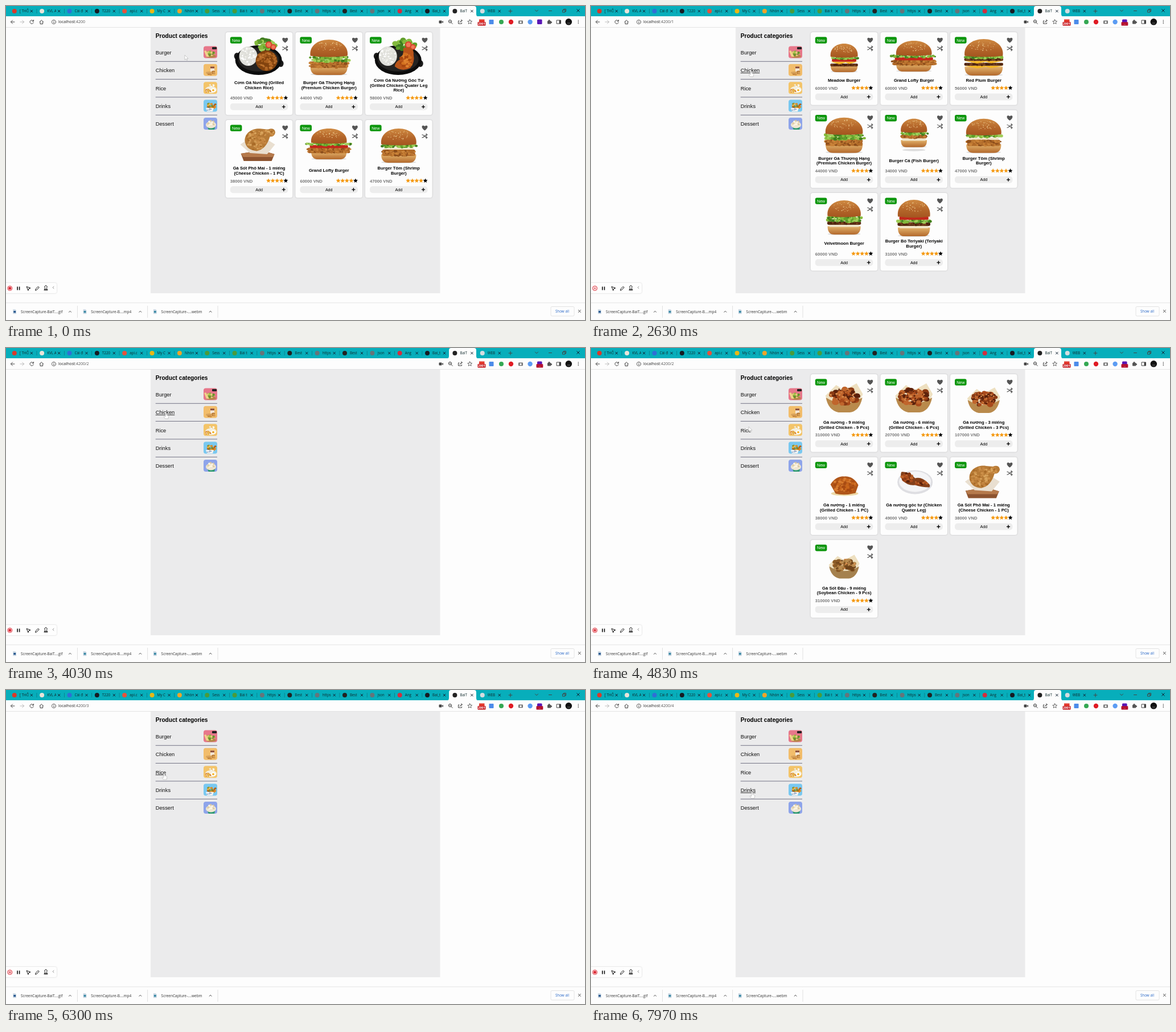
Recreate the animation shown at these times as an HTML page. Size 1017 by 551 pixels, loop 8 s.

```html
<!DOCTYPE html>
<html lang="en">
<head>
<meta charset="utf-8">
<title>Food shop</title>
<style>
html, body { margin: 0; width: 100%; height: 100%; overflow: hidden; background: #fdfdfd; }
svg { display: block; width: 1017px; height: 551px; font-family: "Liberation Sans", Arial, sans-serif; }
.ui { font-family: "Open Sans", "Noto Sans", sans-serif; }
.bold { font-weight: 700; }
.mid { text-anchor: middle; }
.line { fill: none; stroke: #444; stroke-width: 1; stroke-linecap: round; stroke-linejoin: round; }
.card { filter: drop-shadow(0 .8px .8px #0003); }
.step { visibility: hidden; animation: 8s step-end infinite; }
#home { animation-name: home; }
#burgers { animation-name: burgers; }
#chicken { animation-name: chicken; }
#rice { animation-name: rice; }
#badge { animation-name: badge; }
#path1 { animation-name: path1; }
#path2 { animation-name: path2; }
#path3 { animation-name: path3; }
#path4 { animation-name: path4; }
#over0 { animation-name: over0; }
#over1 { animation-name: over1; }
#over2 { animation-name: over2; }
#over3 { animation-name: over3; }
#arrow { animation-name: arrow; }
#hand { animation-name: hand; }
#cursor { animation: move 8s linear infinite; }
#dot { animation: pulse 1s ease-in-out infinite; }
@keyframes home { 0% { visibility: visible } 15.5%, 100% { visibility: hidden } }
@keyframes burgers { 27% { visibility: visible } 46.5%, 100% { visibility: hidden } }
@keyframes chicken { 56% { visibility: visible } 74.5%, 100% { visibility: hidden } }
@keyframes rice { 81% { visibility: visible } 93.5%, 100% { visibility: hidden } }
@keyframes badge { 15.5%, 100% { visibility: visible } }
@keyframes path1 { 15.5% { visibility: visible } 46.5%, 100% { visibility: hidden } }
@keyframes path2 { 46.5% { visibility: visible } 74.5%, 100% { visibility: hidden } }
@keyframes path3 { 74.5% { visibility: visible } 93.5%, 100% { visibility: hidden } }
@keyframes path4 { 93.5%, 100% { visibility: visible } }
@keyframes over0 { 10% { visibility: visible } 17.5%, 100% { visibility: hidden } }
@keyframes over1 { 23.75% { visibility: visible } 57.5%, 100% { visibility: hidden } }
@keyframes over2 { 62% { visibility: visible } 79.5%, 100% { visibility: hidden } }
@keyframes over3 { 83%, 100% { visibility: visible } }
@keyframes arrow {
  0%, 17.5%, 57.5%, 79.5% { visibility: visible }
  10%, 23.75%, 62%, 83%, 100% { visibility: hidden }
}
@keyframes hand {
  0%, 17.5%, 57.5%, 79.5% { visibility: hidden }
  10%, 23.75%, 62%, 83%, 100% { visibility: visible }
}
@keyframes move {
  0%, 2.5% { transform: translate(314px, 86px) }
  11.25%, 16.5% { transform: translate(284px, 82px) }
  20.375% { transform: translate(282px, 98px) }
  25%, 56.25% { transform: translate(281px, 114px) }
  60.375% { transform: translate(277px, 138px) }
  63.75%, 78.75% { transform: translate(278px, 147px) }
  83.75%, 86.625% { transform: translate(282px, 177px) }
  100% { transform: translate(283px, 180px) }
}
@keyframes pulse { 0%, 100% { opacity: 1 } 50% { opacity: .15 } }
</style>
</head>
<body>
<svg id="stage" viewBox="0 0 1017 551"></svg>
<script>
let seed = 7;
const rnd = () => (seed = seed * 16807 % 2147483647) / 2147483647;

const ell = (x, y, rx, ry, fill) => `<ellipse cx="${x}" cy="${y}" rx="${rx}" ry="${ry}" fill="${fill}"/>`;
const dot = (x, y, r, fill) => ell(x, y, r, r, fill);
const box = (x, y, w, h, fill, r = 0) => `<rect x="${x}" y="${y}" width="${w}" height="${h}" rx="${r}" fill="${fill}"/>`;
const shape = (d, fill) => `<path d="${d}" fill="${fill}"/>`;
const line = (d, extra = '') => `<path class="line" d="${d}" ${extra}/>`;
const text = (x, y, size, str, fill = '#111', cls = '') =>
  `<text x="${x}" y="${y + size * .36}" font-size="${size}" fill="${fill}" class="${cls}">${str}</text>`;
const at = (x, y, inner, scale = 1) => `<g transform="translate(${x} ${y}) scale(${scale})">${inner}</g>`;
const cross = (x, y, r, color) => line(`M${x - r} ${y - r}l${2 * r} ${2 * r}m0 ${-2 * r}l${-2 * r} ${2 * r}`, `style="stroke:${color}"`);
const chevron = (x, y, r) => line(`M${x - r} ${y + r / 2}l${r} ${-r}l${r} ${r}`);

// Random spots inside an ellipse
function spots(n, x, y, rx, ry, r, colors) {
  let out = '';
  for (let i = 0; i < n; i++) {
    const a = rnd() * 6.283, d = Math.sqrt(rnd()), k = r * (.7 + rnd() * .6);
    out += ell((x + rx * d * Math.cos(a)).toFixed(1), (y + ry * d * Math.sin(a)).toFixed(1),
      k.toFixed(1), (k * .8).toFixed(1), colors[i % colors.length]);
  }
  return out;
}

const GREEN = ['#5f9e2b', '#83b93c', '#3f7d1f', '#9fce58'];
const FRIED = ['#b06a28', '#c98238', '#8c4e1c', '#bb7631'];
const GLAZE = ['#8a3a14', '#a94a1b', '#5c220c', '#c0652c'];
const GOLD = ['#c48540', '#d8a35c', '#a96b28', '#cd9049'];
const SOY = ['#8a5a26', '#a8783c', '#6e431a', '#b98c50'];
const WHITE = ['#ffffff', '#f3f3ee', '#e8e8e2'];

const salad = (x, y, rx, ry = rx * .6) => spots(30, x, y, rx, ry, rx * .24, GREEN);
const riceDome = (x, y, rx, ry) => ell(x, y, rx, ry, '#dfdfda') + spots(60, x, y - .8, rx - 2, ry - 2, 1.5, WHITE);
const tomato = (x, y, r) => dot(x, y, r, '#d9412b') + dot(x, y, r * .65, '#ee7a58');
const cutlet = (x, y, rx, ry, colors) => ell(x, y, rx, ry, colors[2]) + spots(70, x, y, rx - 2, ry - 2, 2.4, colors);
const egg = (x, y, r) => ell(x, y, r, r * .8, '#fff') + ell(x, y, r * .5, r * .45, '#f4b01e');

// layers run from top to bottom; k is the bun's share of the full half width w
function burger(w, h, layers, y = 0, k = .88) {
  const b = w * k, low = h * .58, step = h * .66 / layers.length;
  const slab = (yy, part, fill, t = step) => box(-w * part, yy - t * .6, 2 * w * part, t * 1.2, fill, t * .5);
  const draw = {
    l: yy => spots(60, 0, yy, w * .96, step * .5, h * .085, GREEN),
    t: yy => slab(yy, .8, '#c3281c'),
    p: yy => slab(yy, .9, '#5c2f16') + spots(44, 0, yy, w * .86, step * .45, h * .05, ['#7d4522', '#4a220e']),
    f: yy => slab(yy, .88, '#ad6426') + spots(70, 0, yy, w * .92, step * .5, h * .075, FRIED),
    c: yy => shape(`M${-w * .9} ${yy - step * .4}H${w * .9}L${w * .35} ${yy + step * .6}L${w * .1} ${yy}L${-w * .3} ${yy + step * .7}Z`, '#f4b624'),
    w: yy => slab(yy, .8, '#f1e5c8', step * .6)
  };
  let out = ell(0, h * .97, b, h * .06, '#d8d8d8') +
    shape(`M${-b} ${low - 2}H${b}Q${b} ${h} ${b * .6} ${h}H${-b * .6}Q${-b} ${h} ${-b} ${low - 2}Z`, 'url(#bunLow)');
  [...layers].reverse().forEach((c, i) => out += draw[c](low - step * (i + .5)));
  out += shape(`M${-b} ${-h * .08}C${-b * 1.08} ${-h * .62} ${-b * .62} ${-h} 0 ${-h}S${b * 1.08} ${-h * .62} ${b} ${-h * .08}Q0 ${h * .04} ${-b} ${-h * .08}Z`, 'url(#bun)');
  out += spots(40, 0, -h * .62, b * .72, h * .27, .7, ['#f3d59c', '#e4b87a']);
  return at(0, y, out);
}

const handles = ell(-39, -1, 5, 6, '#1b1b1b') + ell(38, 12, 5, 6, '#1b1b1b');
const pan = main => handles + ell(-1, 6, 41, 26, '#0c0c0c') + ell(-1, 5, 36, 21, '#242322') +
  salad(11, -21, 18, 9) + tomato(17, -21, 6) + tomato(25, -17, 5) + riceDome(-19, -1, 16, 17) + main;
const grillPan = () => pan(cutlet(13, 7, 19, 18, ['#a9601f', '#c07630', '#82430f', '#b56a28']));
const legPan = () => pan(shape('M8-15Q27-20 26-4Q29 10 20 20Q5 27-7 17Q-6 8 4 4Q9-4 8-15Z', '#b9551a') +
  spots(40, 13, 7, 10, 12, 2.6, ['#d2701f', '#a8470f', '#e0832f']));

function basket(k, colors, weave = '#b98a4c') {
  return at(0, 0, shape('M-33-5L-14-24L0-15L22-27L33-8L20 18L-18 20Z', '#eee0c0') +
    shape('M-32-2Q0 18 32-2Q27 22 10 24H-10Q-28 20-32-2Z', weave) +
    spots(60, 0, -4, 25, 14, 4.6, colors) + spots(40, 0, -6, 24, 12, 1.6, [colors[3], '#d98f4f', colors[2]]), k);
}

const drumstick = (x, y, k) => at(x, y,
  shape('M-24-10C-24-26-8-32 4-30L15-29Q26-33 27-24Q26-17 18-17Q12 4-4 7Q-22 6-24-10Z', '#b67a36') +
  spots(90, -5, -11, 17, 16, 2, GOLD) + spots(26, 15, -23, 9, 5, 2, GOLD), k);
const board = () => shape('M-32 16L4 10L27 17L22 29L-27 29Z', '#8d5430') + shape('M-32 16L4 10L27 17L24 22L-28 22Z', '#b67a4c') +
  shape('M-33 0L-4-20L28 0L14 17L-16 15Z', '#e9dfd0') + drumstick(0, 4, 1.05);
const legPlate = () => ell(2, 1, 31, 21, '#dedee2') + ell(2, 0, 28, 18, '#f4f4f6') +
  shape('M-22-17Q-8-18 2-6Q14-9 24 2Q30 6 27 10Q14 10 2 6Q-10 8-20-2Q-25-10-22-17Z', '#84401a') +
  spots(30, -11, -7, 10, 8, 2.6, GLAZE) + spots(20, 12, 2, 12, 4, 2, GLAZE);
const piece = () => ell(1, 21, 24, 4, '#ecd9a8') + shape('M-24 5Q-14-10 0-9Q16-10 25 6L20 20Q0 25-15 21Z', '#b0561a') +
  spots(70, 0, 7, 20, 12, 2.4, ['#c9661c', '#a84a12', '#d87c30']);
const soup = () => ell(1, 26, 16, 3, '#ddd') + shape('M-22 3Q-18 27-6 27H8Q21 27 24 3Z', '#e2e2e8') +
  ell(1, 3, 23, 11, '#f6f6f6') + ell(1, 3, 20, 8.5, '#b9922a') + spots(36, 1, 3, 16, 6, 1.7, [...GREEN, '#dcae3c', '#eadca0', '#d0642a']);
const plate = (rx, ry, y = 0) => ell(0, y, rx, ry, '#d6d3a4') + ell(0, y - .5, rx - 1.5, ry - 1.5, '#efeed8') + ell(0, y, rx - 7, ry - 6, '#f7f6ee');
const soyPlate = () => plate(45, 31) + salad(-20, -14, 14, 11) + spots(16, -17, -13, 11, 8, 2, ['#e9efc8', '#d7e6a4']) +
  riceDome(11, -15, 19, 15) + drumstick(0, 14, .85) + tomato(-32, 10, 8) + tomato(-24, 19, 8) + tomato(-11, 23, 7) + spots(12, 30, 8, 7, 8, 2, GREEN);
const ballPlate = () => plate(46, 27, 2) + salad(-24, -10, 13, 9) + spots(16, -22, -11, 11, 7, 2, ['#e9efc8', '#d7e6a4']) +
  riceDome(2, -12, 20, 13) + spots(34, 25, 3, 16, 13, 4.4, FRIED) + egg(-3, 5, 14) + tomato(-31, 9, 7) + tomato(-20, 15, 7) + tomato(-9, 19, 6);
const cheesePan = () => at(0, 2, handles + ell(0, 5, 41, 28, '#121212') + salad(0, -24, 18, 9) + riceDome(20, -2, 17, 15) +
  egg(13, 16, 15) + dot(-14, 4, 18, '#3a2218') + ell(-14, 2, 14, 12, '#150c08') + tomato(-26, -15, 8), .7);
const beefPlate = () => ell(2, 25, 27, 3, '#c9c9cc') + plate(31, 18, 0) + salad(-12, -9, 10, 6) + riceDome(14, -7, 14, 11) +
  spots(16, -20, 4, 8, 6, 2.6, ['#d9602a', '#e88a3c']) + shape('M-15 8L22 10L20 17L-14 16Z', '#6d5038') + ell(-3, 3, 9, 5.5, '#f4f4f4') + ell(-3, 3, 7.5, 4, '#2a1510');

// title, price, picture
const lofty = ['Grand Lofty Burger', 60000, () => burger(42, 27, 'ltff', -1, .74)];
const premium = ['Burger Gà Thượng Hạng|(Premium Chicken Burger)', 44000, () => burger(37, 31, 'llff', 1)];
const shrimp = ['Burger Tôm (Shrimp|Burger)', 47000, () => burger(33, 30, 'lwff', 2, .93)];
const cheeseLeg = ['Gà Sốt Phô Mai - 1 miếng|(Cheese Chicken - 1 PC)', 38000, board];
const grillRice = ['Cơm Gà Nướng (Grilled|Chicken Rice)', 45000, grillPan];
const quarterRice = ['Cơm Gà Nướng Góc Tư|(Grilled Chicken Quater Leg|Rice)', 58000, legPan];
const pages = {
  home: [grillRice, premium, quarterRice, cheeseLeg, lofty, shrimp],
  burgers: [
    ['Meadow Burger', 60000, () => burger(27, 25, 'ltcp', 2)], lofty,
    ['Red Plum Burger', 56000, () => burger(38, 32, 'lpcpc', 1)], premium,
    ['Burger Cá (Fish Burger)', 34000, () => ell(0, 27, 20, 2, '#ddd') + burger(26, 25, 'lfw', -3)], shrimp,
    ['Velvetmoon Burger', 60000, () => burger(33, 30, 'llpw')],
    ['Burger Bò Teriyaki (Teriyaki|Burger)', 31000, () => burger(32, 32, 'tlpw', 1)]
  ],
  chicken: [
    ['Gà nướng - 9 miếng|(Grilled Chicken - 9 Pcs)', 310000, () => basket(1, GLAZE)],
    ['Gà nướng - 6 miếng|(Grilled Chicken - 6 Pcs)', 207000, () => basket(1, GLAZE)],
    ['Gà nướng - 3 miếng|(Grilled Chicken - 3 Pcs)', 107000, () => at(0, 4, basket(.88, GLAZE))],
    ['Gà nướng - 1 miếng|(Grilled Chicken - 1 PC)', 38000, piece],
    ['Gà nướng góc tư (Chicken|Quater Leg)', 49000, legPlate], cheeseLeg,
    ['Gà Sốt Đậu - 9 miếng|(Soybean Chicken - 9 Pcs)', 310000, () => at(0, 5, basket(.82, SOY, '#a5814e'))]
  ],
  rice: [
    ['Súp Gà (Chicken Soup)', 12000, soup], grillRice,
    ['Cơm Gà Sốt Đậu (Soybean|Chicken Rice)', 45000, soyPlate],
    ['Cơm Gà Viên (Chicken Ball|Rice)', 45000, ballPlate],
    ['Cơm Thịt Bò Phô Mai (Beef|Cheese Rice)', 45000, cheesePan], quarterRice,
    ['Cơm Thịt Bò (Beef Rice)', 45000, beefPlate]
  ]
};

const starPath = 'M' + Array.from({ length: 10 }, (_, i) => {
  const r = i % 2 ? 1.9 : 4.1, a = i * Math.PI / 5;
  return `${(r * Math.sin(a)).toFixed(2)} ${(-r * Math.cos(a)).toFixed(2)}`;
}).join('L') + 'Z';
const heart = shape('M0 4.8C-8-.5-5-6.5 0-2.8C5-6.5 8-.5 0 4.8Z', '#555');
const shuffle = line('M-4.5-2.5C-1-2.5 0 2.5 4 2.5M-4.5 2.5C-1 2.5 0-2.5 4-2.5M2.5-4.2L4.5-2.5L2.5-.8M2.5 .8L4.5 2.5L2.5 4.2',
  'style="stroke:#555;stroke-width:1.2"');

function card([title, price, food], x, top, h, rows) {
  const lines = title.split('|'), mid = x + 58.8, end = top + h;
  const first = top + 84.2 + (rows - lines.length) * 4.35;
  let out = `<g class="card">${box(x, top, 117.6, h, '#fdfdfd', 4)}</g>` + at(mid, top + 43, food());
  out += box(x + 8, top + 8.3, 20.6, 11.4, '#0c960c', 3) + text(x + 18.3, top + 14, 7, 'New', '#fff', 'mid');
  out += at(x + 104.5, top + 13.6, heart) + at(x + 104.5, top + 28.3, shuffle);
  lines.forEach((s, i) => out += text(mid, first + i * 8.7, 7.66, s, '#000', 'bold mid'));
  out += text(x + 8, end - 29.8, 7.64, price + ' VND', '#777', 'bold');
  for (let i = 0; i < 5; i++) out += at(x + 75.2 + i * 7.6, end - 30, shape(starPath, i < 4 ? '#f59a13' : '#000'));
  out += box(x + 8, end - 20.4, 101.5, 12, '#ededed', 5) + text(mid, end - 14.4, 7.1, 'Add', '#000', 'mid');
  return out + line(`M${x + 99.5} ${end - 14.4}h5m-2.5-2.5v5`, 'style="stroke:#000;stroke-width:1.3"');
}

function page(id, items) {
  let out = '', top = 46;
  for (let i = 0; i < items.length; i += 3) {
    const row = items.slice(i, i + 3);
    const rows = Math.max(...row.map(p => p[0].split('|').length));
    const h = 127.8 + 8.7 * (rows - 1);
    row.forEach((p, k) => out += card(p, 385.8 + k * 122.6, top, h, rows));
    top += h + 8.9;
  }
  return `<g class="step" id="${id}">${out}</g>`;
}

function browser() {
  const names = ['[ THÔ', 'KVL A', 'Cài đ', 'T220', 'api.c', 'My C', 'Nhóm', 'Sess', 'Bài t', 'https', 'Best', 'https', 'Best', 'json', 'Ang', 'Bai_t', 'BaiT', 'WEB'];
  const marks = ['#d93a2b', '#e9e4da', '#2f6fd6', '#161b22', '#e5533d', '#e9b816', '#eda52a', '#4a9b3c', '#4a9b3c',
    '#66757a', '#222', '#66757a', '#222', '#66757a', '#d32f3f', '#161b22', '#222', '#d5dde0'];
  let out = box(0, 0, 1017, 18, '#07aebb') + shape('M775 18.5Q778 18 778 14V4Q778 0 782 0H822Q826 0 826 4V14Q826 18 829 18.5Z', '#fdfdfd');
  names.forEach((s, i) => {
    const x = 14.8 + i * 48.35;
    out += dot(x, 9, 4, marks[i]) + `<g clip-path="url(#tab)" transform="translate(${x + 9} 9)">${text(0, 0, 6.3, s, '#102a2d')}</g>`;
    out += cross(x + 30, 9, 1.9, '#123');
    if (i && i !== 16 && i !== 17) out += box(x - 9.5, 5, .7, 8, '#0b7680');
  });
  out += line('M883 9h6m-3-3v6M929.5 7l2.5 2.5l2.5-2.5M953.5 8.500h5M978 7h4v4h-4zM979.5 7v-1.5h4v4h-1.5') + cross(1005, 8, 2.3, '#123');
  // Toolbar
  out += box(0, 18, 1017, 19, '#fdfdfd') + box(0, 37, 1017, .8, '#dedede');
  out += line('M15 28H8.5l3-3m-3 3l3 3') + line('M25 28h6.5l-3-3m3 3l-3 3', 'opacity=".35"');
  out += line('M48 26.3A3.2 3.2 0 1 0 48.3 29M48.5 24.5v2.3h-2.3M59 28l3.3-3.3l3.3 3.3M60 27.5v4h4.6v-4');
  out += line('M84 27.6v2.2M84 25.8v.1') + '<circle class="line" cx="84" cy="28" r="3.6" style="stroke-width:.8"/>';
  out += text(92, 27.8, 6.97, 'localhost<tspan fill="#555">:4200</tspan>', '#222');
  for (let i = 1; i < 5; i++) out += `<g class="step" id="path${i}">${text(139, 27.8, 6.97, '/' + i, '#555')}</g>`;
  out += box(760.5, 25.5, 5, 5, '#444', 1) + shape('M765.5 28l2.500-2v4z', '#444');
  out += '<circle class="line" cx="780" cy="27" r="2.6"/>' + line('M782 29l2.3 2.3M779 27h2');
  out += line('M796 26h-1.5v5h6v-1.5M797 29q.5-3 4-3.5m-1.5-1.5l2 1.5l-2 1.8') + at(814.7, 28, `<path class="line" d="${starPath}" style="stroke-width:.8"/>`);
  out += box(831, 23.5, 9.5, 8, '#e33b30') + box(828.5, 28, 14, 6.6, '#c5161d', 1) + text(835.6, 31.3, 5.6, '2901', '#fff', 'mid bold');
  out += box(848.5, 24, 8, 8, '#4b8bea', 1) + dot(870, 28, 4, '#35a853') + dot(887, 28, 4.2, '#e01b24');
  out += box(900, 25.5, 8, 5.8, '#777', 1) + dot(904, 28.4, 1.7, '#fdfdfd') + dot(920.6, 28, 4.2, '#5b9cf3') + box(933, 23.5, 8.6, 8.6, '#5a17b5', 1.5);
  out += `<g class="step" id="badge">${box(931.5, 28.3, 11.8, 6.3, '#b5122e', 1)}${text(937.4, 31.2, 5, '...', '#f2b8c0', 'mid')}</g>`;
  out += box(951, 26, 6.3, 5.5, '#555', 1) + dot(954, 25.5, 1.5, '#555') + dot(957.7, 28.7, 1.4, '#555');
  out += line('M967.5 25h7v6h-7z') + box(971.5, 25, 3, 6, '#444') + dot(988.3, 27.8, 5.8, '#111') + ell(988.3, 30, 3, 1.5, '#363636');
  for (let i = 0; i < 3; i++) out += dot(1005.3, 25.3 + i * 2.6, .8, '#444');
  return `<g class="ui">${out}</g>`;
}

function sidebar() {
  const cats = [['Burger', '#e7778a', 28], ['Chicken', '#f2bd6b', 33.6], ['Rice', '#f3c469', 18.1], ['Drinks', '#79c8f0', 26.4], ['Dessert', '#8ea4ea', 32]];
  const pics = [
    () => ell(1, 7, 9, 3, '#b58648') + spots(18, 1, 2, 6, 4, 2, ['#8fba3a', '#e6c87c', '#6a8f2d']) + box(3, -9, 8, 4, '#222', 1) + shape('M-11-2L-8-3L-2 8L-7 8Z', '#f1d28a'),
    () => box(0, -6, 7, 11, '#f4e6d4', 1) + box(0, -6, 7, 3, '#8a4a35') + spots(18, 0, 5, 8, 3, 2, GOLD),
    () => ell(1, 3, 10, 6, '#f5efdc') + spots(10, -4, 5, 5, 3, 1.6, ['#d98335', '#e5b04a']) + egg(5, 4, 4) + spots(8, 2, -4, 5, 2, 1.3, WHITE),
    () => spots(28, 2, 0, 8, 5, 1.8, ['#e08a23', '#b5611a', '#7a8c2c', '#efb443']) + shape('M-8 4H6L4 10H-6Z', '#f2f2f2') + spots(6, -2, 7, 4, 2, .8, ['#4672a8']),
    () => shape('M-7 2H9L7 11H-3Z', '#2f9a72') + ell(1, 2, 9, 6, '#efe6d2') + spots(14, 1, -1, 6, 4, 1.6, ['#fff8e6', '#dcc9a0'])
  ];
  let out = box(254, 38, 508.5, 466, '#ebebec') + text(262.7, 52, 10.15, 'Product categories', '#000', 'bold');
  cats.forEach(([name, color, w], i) => {
    const y = 81.7 + i * 31.35;
    out += text(262.7, y, 9.3, name, '#111') + at(359, y - .7, `<g clip-path="url(#thumb)">${box(-12, -11, 24, 22, color)}${pics[i]()}</g>`);
    if (i < 4) out += box(262.7, y + 15.1, 108.3, .9, '#66667a') + `<g class="step" id="over${i}">${box(262.7, y + 4.2, w, .8, '#111')}</g>`;
  });
  return out;
}

function footer() {
  let out = `<g class="card">${box(-5, 486, 94, 18, '#fefefe', 3)}</g>`;
  out += '<circle cx="6.8" cy="495.3" r="4" fill="none" stroke="#dc2430"/>' + `<g id="dot">${dot(6.8, 495.3, 2.5, '#dc2430')}</g>` + dot(6.8, 495.3, .9, '#dc2430');
  out += box(19.3, 492.5, 1.6, 6, '#111') + box(22.8, 492.5, 1.6, 6, '#111');
  out += line('M36.5 492.5l6.5 2.5l-3 1l-1 3zM51.7 498.7l.6-2.3l4.2-4.2l1.7 1.7l-4.2 4.2zM67 498.5h6M67.5 497q2-1 1-2.5a2.2 2.2 0 1 1 3 0q-1 1.5 1 2.5z', 'style="stroke:#111"');
  out += line('M84 492l-2 2l2 2', 'style="stroke:#999"');
  out += box(0, 521, 1017, 30, '#fdfdfd') + box(0, 520.5, 1017, .8, '#dcdcdc');
  ['BaiT....gif', 'B....mp4', '....webm'].forEach((s, i) => {
    const x = 15 + i * 123.3;
    out += shape(`M${x - 2.7} 532.3h4l1.7 1.7v6.3h-5.7z`, '#c9d6e2') + box(x - 1.7, 535, 3.8, 3.3, i ? '#3a8aa5' : '#28588f');
    out += text(x + 11, 536.3, 6.47, 'ScreenCapture-' + s, '#333') + chevron(x + 97.5, 536.3, 2) + box(x + 110, 526, .8, 21, '#d9d9d9');
  });
  out += '<rect x="957" y="527.5" width="41" height="16.5" rx="2" fill="none" stroke="#ddd" stroke-width=".8"/>';
  out += text(977, 535.8, 6.3, 'Show all', '#2868c8', 'mid') + cross(1007.4, 535.5, 2, '#444');
  return `<g class="ui">${out}</g>`;
}

const cursor = `<g id="cursor" stroke="#aaa" stroke-width=".6" stroke-linejoin="round">
  <path class="step" id="arrow" fill="#fff" d="M0 0V8.5L2 6.7L3.4 9.7L4.7 9.1L3.4 6.2H6Z"/>
  <path class="step" id="hand" fill="#fff" d="M-1 0Q0-.8 1 0V3.5L4 4.2Q5 4.5 4.8 6L4 10H-1.5L-4 6.5Q-3.5 5-1 6.5Z"/></g>`;

const defs = `<defs>
  <linearGradient id="bun" x1="0" y1="0" x2="0" y2="1"><stop stop-color="#cf8a42"/><stop offset=".55" stop-color="#b4662a"/><stop offset="1" stop-color="#a4551f"/></linearGradient>
  <linearGradient id="bunLow" x1="0" y1="0" x2="0" y2="1"><stop stop-color="#e3b36c"/><stop offset="1" stop-color="#b3692c"/></linearGradient>
  <clipPath id="tab"><rect x="0" y="-6" width="16" height="12"/></clipPath>
  <clipPath id="thumb"><rect x="-12" y="-10.5" width="24" height="21" rx="4"/></clipPath></defs>`;

document.getElementById('stage').innerHTML = defs + box(0, 0, 1017, 551, '#fdfdfd') + sidebar() +
  Object.entries(pages).map(([id, items]) => page(id, items)).join('') + browser() + footer() + cursor;
</script>
</body>
</html>
```
